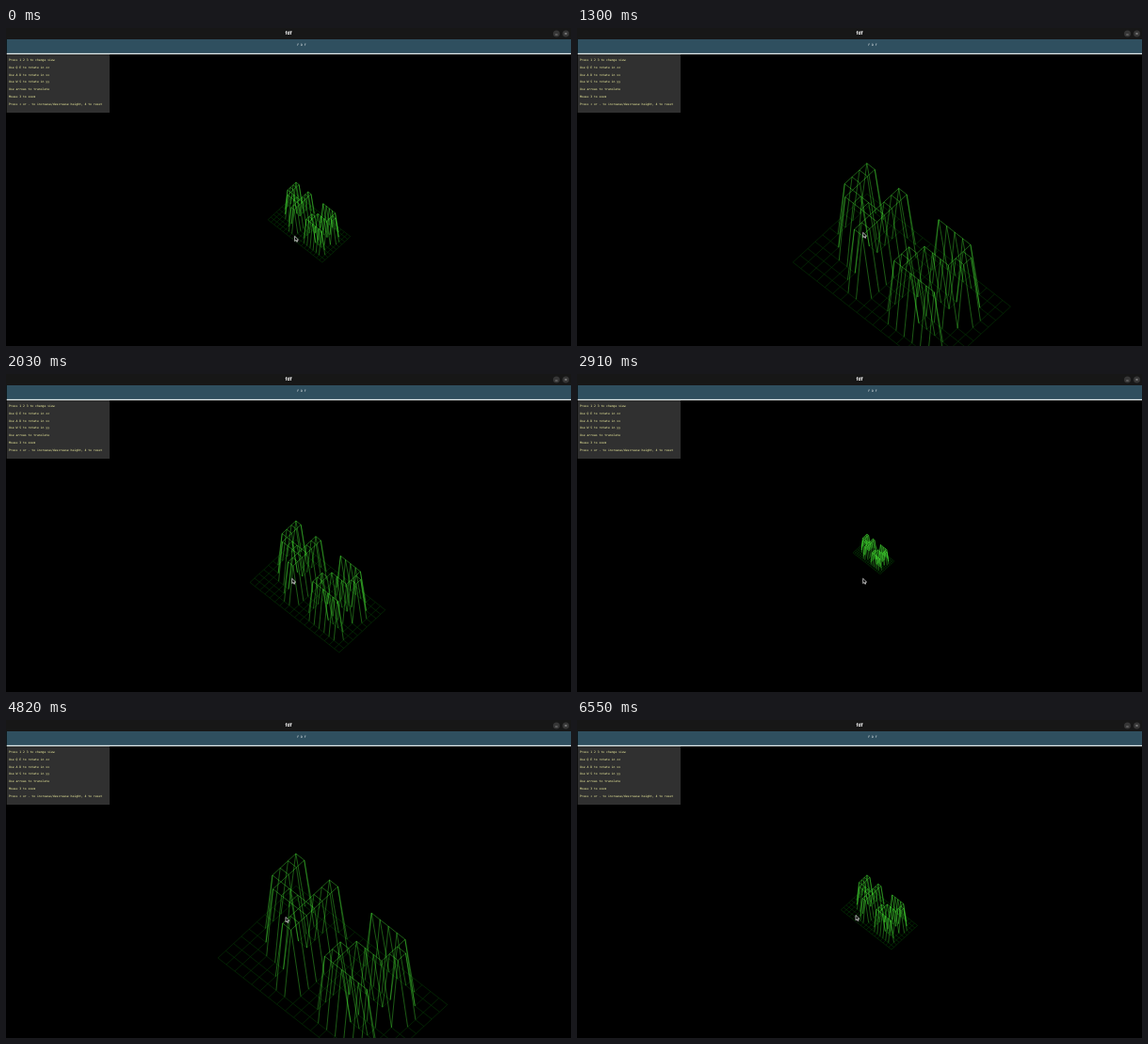
An HTML page with a canvas that plays this animation: 600x338 px, repeating every 6.58 s.

```html
<!DOCTYPE html>
<html lang="en">
<head>
<meta charset="utf-8">
<title>fdf</title>
<style>
  html, body { margin: 0; width: 100%; height: 100%; overflow: hidden; background: #000; }
  canvas { display: block; width: 600px; height: 338px; }
</style>
</head>
<body>
<canvas id="stage" width="600" height="338"></canvas>
<script>
const ctx = document.getElementById('stage').getContext('2d');
ctx.textRendering = 'geometricPrecision';
const LOOP = 6580;
const PIXEL = 1 / 3.2; // the window is 1920 px wide, shown at 600

const MAP = `
...................
...................
..##..##...#####...
..##..##.......##..
..##..##.......##..
..######....####...
...#####...##......
......##...##......
......##...######..
...................
...................`.trim().split('\n');
const HEIGHT = 10;
const ORIGIN = { x: 308, y: 176.3 };
const DEGREE = Math.PI / 180;
const TURN = 44 * DEGREE, TILT = 58.5 * DEGREE, ROLL = 1.3 * DEGREE;

const HELP = [
  'Press 1 2 3 to change view',
  'Use Q E to rotate in zz',
  'Use A D to rotate in xx',
  'Use W S to rotate in yy',
  'Use arrows to translate',
  'Mouse 3 to zoom',
  'Press + or - to increase/descrease height, 4 to reset',
];

// Bursts of evenly spaced wheel clicks: first click, last click, cell size reached
const FIRST_CELL = 14;
const BURSTS = [
  [30, 520, 23], [670, 1260, 38], [1300, 1670, 31], [1820, 2030, 23], [2120, 2420, 15],
  [2550, 2910, 7], [3120, 3360, 10], [3580, 4210, 24], [4240, 4820, 39], [4940, 4970, 40],
  [5520, 5760, 26], [5820, 6030, 20], [6180, 6550, 13],
];

const progress = (time, start, end) => Math.min(1, Math.max(0, (time - start) / (end - start)));

function cellAt(time) {
  let cell = FIRST_CELL;
  for (const [first, last, goal] of BURSTS) {
    if (time < first) break;
    const clicks = Math.abs(goal - cell);
    const done = 1 + Math.round(progress(time, first, last) * (clicks - 1));
    cell += Math.sign(goal - cell) * done;
  }
  return cell;
}

function pointerAt(time) {
  const nudge = progress(time, 30, 520);
  const drift = progress(time, 3600, 4800);
  const rest = progress(time, 5800, 6300);
  return [306.6 - 2.9 * nudge - 6.7 * drift - rest, 221.3 - 4 * nudge - 7.8 * drift - 2 * rest];
}

function rect(color, x, y, w, h) {
  ctx.fillStyle = color;
  ctx.fillRect(x, y, w, h);
}

function text(string, x, y, font, color, align = 'left') {
  ctx.font = font;
  ctx.fillStyle = color;
  ctx.textAlign = align;
  ctx.textBaseline = 'middle';
  ctx.fillText(string, x, y);
}

function segment(color, width, ...points) {
  ctx.strokeStyle = color;
  ctx.lineWidth = width;
  ctx.beginPath();
  for (const [x, y] of points) ctx.lineTo(x, y);
  ctx.stroke();
}

function drawWindow() {
  rect('#000', 0, 0, 600, 338);
  rect('#171717', 0, 0, 600, 12);
  text('fdf', 300, 5.9, 'bold 5px "Open Sans", sans-serif', '#fff', 'center');
  for (const x of [584.5, 594.5]) {
    ctx.fillStyle = '#363636';
    ctx.beginPath();
    ctx.arc(x, 6, 3.5, 0, 2 * Math.PI);
    ctx.fill();
  }
  segment('#ccc', 0.5, [583.3, 7], [585.7, 7]);
  segment('#ccc', 0.5, [593.4, 4.9], [595.6, 7.1]);
  segment('#ccc', 0.5, [595.6, 4.9], [593.4, 7.1]);

  const mono = '3.115px "DejaVu Sans Mono", monospace';
  rect('#2f4f5f', 0.7, 12, 599.3, 15);
  rect('#e4ecec', 0.7, 26.8, 599.3, 1.2);
  text('F D F', 309.3, 18.3, mono, '#fff');
  rect('#303030', 0.7, 28, 109.3, 62);
  HELP.forEach((line, i) => text(line, 3, 34.2 + i * 7.8, mono, '#ffffa8'));
}

function drawMap(cell) {
  const unit = cell * PIXEL;
  const high = (x, y) => MAP[y][x] === '#';
  const project = (x, y) => {
    const across = x * Math.cos(TURN) - y * Math.sin(TURN);
    const depth = x * Math.sin(TURN) + y * Math.cos(TURN);
    const down = depth * Math.sin(TILT) - (high(x, y) ? HEIGHT * Math.cos(TILT) : 0);
    return [
      ORIGIN.x + unit * (across * Math.cos(ROLL) + down * Math.sin(ROLL)),
      ORIGIN.y + unit * (down * Math.cos(ROLL) - across * Math.sin(ROLL)),
    ];
  };
  const edge = (x0, y0, x1, y1) => {
    if (!MAP[y1] || !MAP[y1][x1]) return;
    const color = high(x0, y0) || high(x1, y1) ? '#50ff3c' : '#0a5a0a';
    segment(color, 0.36, project(x0, y0), project(x1, y1));
  };
  MAP.forEach((row, y) => {
    for (let x = 0; x < row.length; x++) {
      edge(x, y, x + 1, y);
      edge(x, y, x, y + 1);
    }
  });
}

function drawPointer(x, y) {
  ctx.save();
  ctx.translate(x, y);
  ctx.beginPath();
  for (const [px, py] of [[0, 0], [0, 5.3], [1.3, 4.2], [2.2, 6.1], [3, 5.7], [2.2, 3.9], [3.9, 3.8]]) ctx.lineTo(px, py);
  ctx.closePath();
  ctx.fillStyle = '#000';
  ctx.fill();
  ctx.strokeStyle = '#eee';
  ctx.lineWidth = 0.7;
  ctx.stroke();
  ctx.restore();
}

const start = performance.now();
function draw() {
  const time = (performance.now() - start) % LOOP;
  drawWindow();
  drawMap(cellAt(time));
  drawPointer(...pointerAt(time));
  requestAnimationFrame(draw);
}
draw();
</script>
</body>
</html>
```
